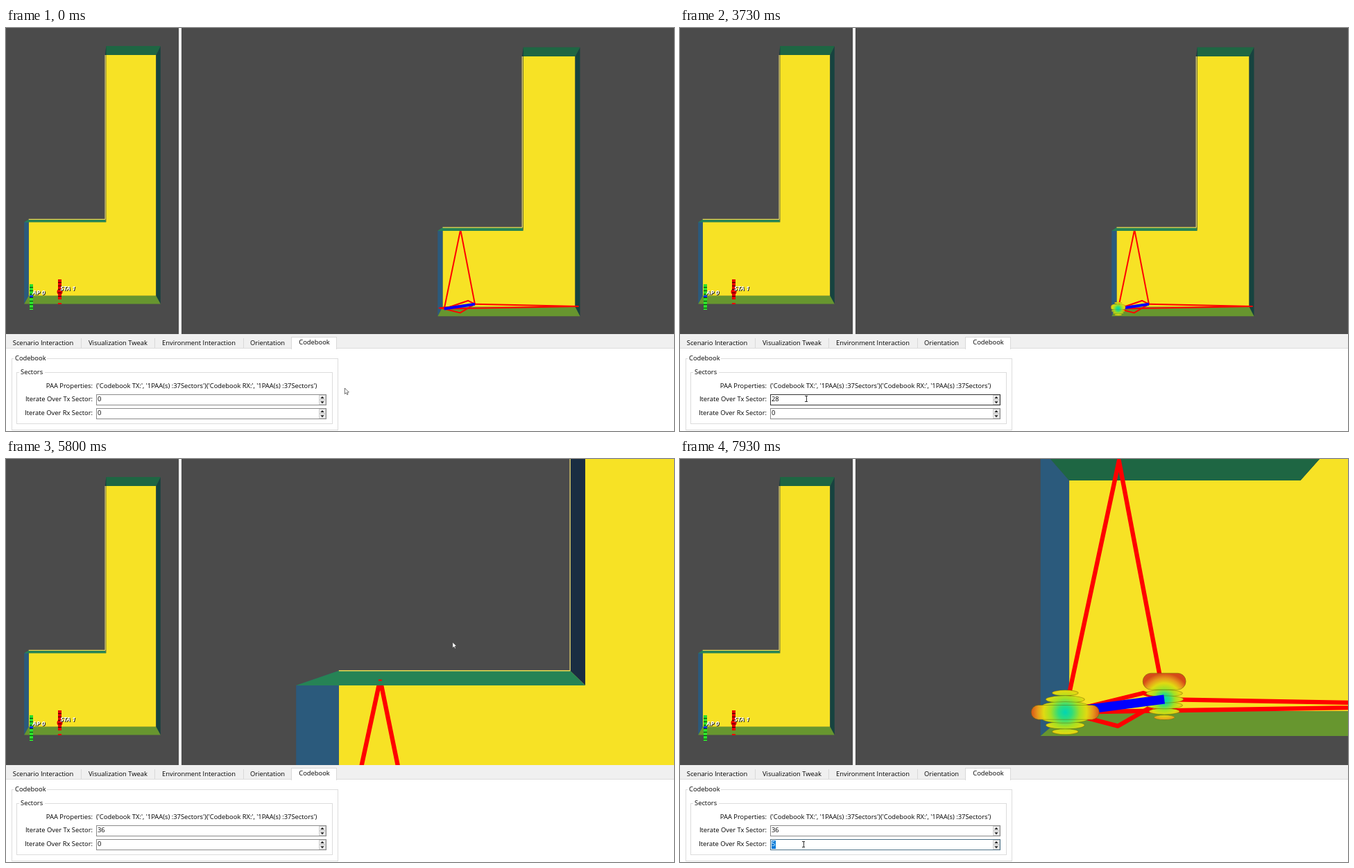
These frames come from a looping animation (963x582 px, 8 s). An HTML page with a canvas:

```html
<!DOCTYPE html>
<html lang="en">
<head>
<meta charset="utf-8">
<title>Codebook sector viewer</title>
<style>
html, body { margin: 0; overflow: hidden; background: #fff; }
canvas { display: block; }
</style>
</head>
<body>
<canvas id="stage" width="963" height="582"></canvas>
<script>
const ctx = document.getElementById('stage').getContext('2d');
const LOOP = 8000, TICK = 200 / 3;
const FONT = '500 9.4px "Open Sans", "Noto Sans", sans-serif';

// Room plan in world units; z is the inverse-depth offset of the wall tops.
const STEP_X = 114.8, RIGHT = 191, STEP_Y = 247.1, BOTTOM = 361.8, RIM = 0.069;
const TX = [7.4, 354.4, 0.055], RX = [48.2, 351.5, 0.035], APEX = [28.9, STEP_Y, 0.045];
const RAYS = [
  [TX, APEX, RX],
  [TX, [36.8, 352.8, 0], RX],
  [TX, [28.4, BOTTOM, 0.045], RX],
  [TX, [RIGHT, 352.8, 0.045], RX],
  [TX, [0, 354.2, 0.05], RX]
];

// Keys: time, log zoom, plan origin relative to the view centre.
const CAMERA = [
  [5130, 0, -96.5, -180], [5530, 0.893, -96.5, -180], [5610, 0.893, -96.5, -180],
  [5670, 1.066, -96.5, -180], [6067, 1.066, -62, -291.5], [6333, 1.066, -62, -291.5],
  [6600, 1.066, -56.8, -312.5]
];
const POINTER = [
  [0, 489, 520], [70, 480, 520], [600, 182, 536], [4945, 182, 536], [5000, 320, 490], [5010, 320, 490],
  [5130, 500, 430], [5400, 604, 396], [5670, 604, 396], [6067, 721, 9], [6205, 721, 9],
  [6333, 700, 150], [6600, 717, 78], [6730, 389, 442], [6740, 389, 442],
  [6870, 250, 492], [7200, 178, 557]
];
// Bursts of wheel steps: first time, last time, number of steps.
const TX_STEPS = [
  [870, 930, 2], [1070, 1200, 2], [1530, 1870, 6], [2200, 2330, 3], [2670, 2800, 3],
  [3130, 3330, 4], [3600, 3730, 3], [4070, 4130, 2], [4470, 4600, 3]
];
const RX_STEPS = [[7270, 7470, 4], [7870, 7930, 1]];

function track(keys, t) {
  const i = keys.findIndex(k => k[0] > t);
  if (i === 0) return keys[0].slice(1);
  if (i < 0) return keys[keys.length - 1].slice(1);
  const a = keys[i - 1], b = keys[i], p = (t - a[0]) / (b[0] - a[0]);
  return a.slice(1).map((v, j) => v + (b[j + 1] - v) * p);
}

function countSteps(bursts, t) {
  return bursts.reduce((sum, [from, to, n]) => t < from ? sum :
    sum + Math.min(n, 1 + Math.floor((t - from) * (n - 1) / (to - from))), 0);
}

function rect(x, y, w, h, color) {
  ctx.fillStyle = color;
  ctx.fillRect(x, y, w, h);
}

function frame(x, y, w, h, color) {
  ctx.strokeStyle = color;
  ctx.lineWidth = 1;
  ctx.strokeRect(x + 0.5, y + 0.5, w - 1, h - 1);
}

function path(points, close) {
  ctx.beginPath();
  points.forEach(p => ctx.lineTo(p[0], p[1]));
  if (close) ctx.closePath();
}

function polygon(points, color) {
  path(points, true);
  ctx.fillStyle = color;
  ctx.fill();
}

function polyline(points, color, width) {
  path(points);
  ctx.strokeStyle = color;
  ctx.lineWidth = width;
  ctx.stroke();
}

function text(str, x, y, align = 'left', color = '#000') {
  ctx.font = FONT;
  ctx.textAlign = align;
  ctx.textBaseline = 'middle';
  ctx.fillStyle = color;
  ctx.fillText(str, x, y);
}

const depthScale = (cam, z) => 1 / (1 / cam.zoom - z);

function project(cam, [x, y, z]) {
  const s = depthScale(cam, z);
  return [cam.cx + (cam.x + x) * s, cam.cy + (cam.y + y) * s];
}

function drawRoom(cam, drawInside) {
  const at = (x, y, z = 0) => project(cam, [x, y, z]);
  const wall = (x1, y1, x2, y2, color) =>
    polygon([at(x1, y1), at(x2, y2), at(x2, y2, RIM), at(x1, y1, RIM)], color);
  const stepFacing = cam.y + STEP_Y < 0;
  const stepWall = () => wall(0, STEP_Y, STEP_X, STEP_Y, stepFacing ? '#1e6643' : '#268355');

  polygon([at(STEP_X, 0), at(RIGHT, 0), at(RIGHT, BOTTOM), at(0, BOTTOM), at(0, STEP_Y), at(STEP_X, STEP_Y)], '#f7e225');
  wall(RIGHT, 0, RIGHT, BOTTOM, '#16433f');
  wall(0, STEP_Y, 0, BOTTOM, '#2b5a7c');
  wall(STEP_X, 0, RIGHT, 0, '#1e6643');
  wall(0, BOTTOM, RIGHT, BOTTOM, '#67962f');
  wall(STEP_X, 0, STEP_X, STEP_Y, '#1a2d42');
  if (stepFacing) stepWall();
  drawInside();
  if (!stepFacing) {
    stepWall();
    polyline([at(0, STEP_Y), at(STEP_X, STEP_Y)], '#f0dc50', 1.3);
  }
  const edgeX = at(STEP_X, 0)[0];
  polyline([[edgeX, at(STEP_X, 0)[1]], [edgeX, at(STEP_X, STEP_Y, stepFacing ? RIM : 0)[1]]], '#f0dc70', 1.2);
}

// Stacked side lobes around one main ring; colour follows distance from the middle.
function drawPattern(cam, place, sector, reach = 14.2) {
  const [x, y] = project(cam, place), s = depthScale(cam, place[2]);
  const tilt = -Math.sin(Math.PI / 10 * (sector % 9)), off = Math.abs(tilt);
  const paint = ctx.createRadialGradient(x, y, 0, x, y, (14.5 - 2.8 * off) * s);
  [[0, '#00d5b5'], [0.2, '#2fdc7c'], [0.42, '#a5e023'], [0.62, '#e0da12'], [0.8, '#e79a1b'], [1, '#d54a18']]
    .forEach(([p, color]) => paint.addColorStop(p, color));
  const fill = () => {
    ctx.fillStyle = paint;
    ctx.fill();
    ctx.strokeStyle = 'rgba(95,105,0,.45)';
    ctx.lineWidth = 0.3 * s;
    ctx.stroke();
  };
  const ring = (dy, rx, ry) => {
    ctx.beginPath();
    ctx.ellipse(x, y + dy * s, rx * s, ry * s, 0, 0, 7);
    fill();
  };
  const torus = (dx, dy, rx, ry) => {
    ctx.beginPath();
    ctx.roundRect(x + (dx - rx) * s, y + (dy - ry) * s, 2 * rx * s, 2 * ry * s, ry * s);
    fill();
  };
  const wide = 10.2 - 1.6 * off;
  for (let j = 3; j >= 0; j--) {
    const rx = wide * (1 - (j / 4.4) ** 2), ry = 0.14 * rx + 0.4;
    ring(-2.7 * j, rx, ry);
    if (j) ring(2.7 * j, rx, ry);
  }
  if (sector % 4 === 0 && sector < 24) torus(14, -1, 12, 3);
  torus(0, 8 * tilt, reach - 4.6 * off, 3 + 0.7 * off);
}

function drawRays(cam, t, tx, rx) {
  ctx.lineCap = ctx.lineJoin = 'round';
  const width = depthScale(cam, 0.045);
  RAYS.forEach(ray => polyline(ray.map(p => project(cam, p)), '#f00', 1.9 * width));
  ctx.lineCap = 'butt';
  if (rx) drawPattern(cam, RX, rx);
  polyline([project(cam, TX), project(cam, RX)], '#00f', 3.9 * width);
  if (t > 1070) drawPattern(cam, TX, tx, t < 5670 ? 11.4 : 14.2);
}

function drawDevice(x, y, h, color, label, labelX, labelY) {
  rect(x, y, 5, h, color);
  for (let i = 4; i < h; i += 5) rect(x, y + i, 5, 1, 'rgba(0,0,0,.75)');
  ctx.font = 'italic bold 9px "Open Sans", "Noto Sans", sans-serif';
  ctx.textAlign = 'left';
  ctx.textBaseline = 'middle';
  [[1, '#222'], [0, '#fff']].forEach(([d, fill]) => {
    ctx.fillStyle = fill;
    ctx.fillText(label, labelX + d, labelY + d);
  });
}

function drawOverview() {
  drawRoom({ cx: 126, cy: 221, zoom: 0.961, x: -97, y: -189.4 }, () => {});
  rect(75, 397, 5, 2, '#f00');
  ctx.beginPath();
  ctx.arc(77.5, 381, 4, 0, 7);
  ctx.fillStyle = '#e00000';
  ctx.fill();
  drawDevice(34, 370, 37, '#2be02b', 'AP 0', 38, 383);
  rect(34, 386, 5, 3, '#1030e0');
  drawDevice(75, 363, 29, '#e80000', 'STA 1', 78, 377);
}

function drawSpin(y, value, pointer, focused) {
  const hover = pointer[0] > 130 && pointer[0] < 462 && Math.abs(pointer[1] - y - 8) < 9;
  rect(130, y, 332, 16, '#fff');
  frame(130, y, 332, 16, focused ? '#4d7187' : hover ? '#333' : '#8a8a8a');
  if (focused) rect(132, y + 2, 6, 12, '#0078d7');
  text(String(value), 132, y + 8, 'left', focused ? '#fff' : '#000');
  [1, 8].forEach((dy, i) => {
    rect(451, y + dy, 10, 7, '#efefef');
    frame(451, y + dy, 10, 7, '#cfcfcf');
    const base = y + dy + (i ? 2.2 : 5);
    polygon([[453.3, base], [458.7, base], [456, base + (i ? 3 : -3)]], '#222');
  });
}

function drawPanel(t, tx, rx, pointer) {
  rect(0, 442, 963, 140, '#fff');
  rect(0, 442, 963, 20, '#f0f0f0');
  rect(0, 462, 963, 1, '#dcdcdc');
  [108, 214, 342].forEach(x => rect(x, 448, 1, 14, '#d9d9d9'));
  frame(411, 446, 66, 18, '#d9d9d9');
  rect(412, 447, 64, 17, '#fff');
  [['Scenario Interaction', 53.5, 456], ['Visualization Tweak', 161.5, 456], ['Environment Interaction', 278, 456],
    ['Orientation', 377, 456], ['Codebook', 444.5, 455]].forEach(([s, x, y]) => text(s, x, y, 'center'));

  frame(8, 477, 471, 104, '#dcdcdc');
  rect(11, 475, 48, 6, '#fff');
  text('Codebook', 13, 478);
  frame(15, 497, 456, 75, '#dcdcdc');
  rect(19, 495, 37, 6, '#fff');
  text('Sectors', 21, 498);
  text('PAA Properties:', 125, 518, 'right');
  text("('Codebook TX:', '1PAA(s) :37Sectors')('Codebook RX:', '1PAA(s) :37Sectors')", 130, 518);
  text('Iterate Over Tx Sector:', 125, 537, 'right');
  text('Iterate Over Rx Sector:', 125, 557, 'right');
  drawSpin(529, tx, pointer, false);
  drawSpin(549, rx, pointer, t > 7200);
}

function drawPointer([x, y]) {
  if (x < 450 && y > 528) {
    polyline([[x - 2, y - 4.5], [x + 2, y - 4.5]], '#333', 1);
    polyline([[x + 0.5, y - 5], [x + 0.5, y + 4]], '#333', 1);
    polyline([[x - 2, y + 3.5], [x + 2, y + 3.5]], '#333', 1);
  } else if (Math.abs(y - 442) < 3) {
    polyline([[x - 5, y], [x + 5, y]], '#333', 2);
    polyline([[x, y - 5], [x, y + 5]], '#333', 1);
    [-1, 1].forEach(d => polygon([[x - 2, y + 3 * d], [x + 2, y + 3 * d], [x, y + 6 * d]], '#333'));
  } else {
    const shape = [[0, 0], [0, 8.5], [2, 6.8], [3.4, 9.6], [4.7, 9], [3.4, 6.2], [6, 6]]
      .map(([dx, dy]) => [x + dx, y + dy]);
    polygon(shape, '#fff');
    ctx.lineWidth = 0.7;
    ctx.strokeStyle = '#333';
    ctx.stroke();
  }
}

function draw(time) {
  const t = Math.floor((time % LOOP + 4) / TICK) * TICK + 5;
  const n = countSteps(TX_STEPS, t);
  const tx = n <= 14 ? n : Math.round(14 + (n - 14) * 22 / 14);
  const rx = countSteps(RX_STEPS, t);
  const pointer = track(POINTER, t);
  const [logZoom, x, y] = track(CAMERA, t);
  const cam = { cx: 726, cy: 221, zoom: Math.exp(logZoom), x, y };

  rect(0, 0, 963, 442, '#4b4b4b');
  drawOverview();
  ctx.save();
  ctx.beginPath();
  ctx.rect(253, 0, 710, 442);
  ctx.clip();
  drawRoom(cam, () => drawRays(cam, t, tx, rx));
  if (cam.y + STEP_Y > 0 && cam.zoom > 1.5) {
    const [ax, ay] = project(cam, APEX);
    rect(ax - 2.5, ay, 5, 2, '#f00');
  }
  ctx.restore();
  rect(249, 0, 4, 442, '#f0f0f0');
  drawPanel(t, tx, rx, pointer);
  drawPointer(pointer);
}

function tick() {
  draw(performance.now());
  requestAnimationFrame(tick);
}
tick();
</script>
</body>
</html>
```
